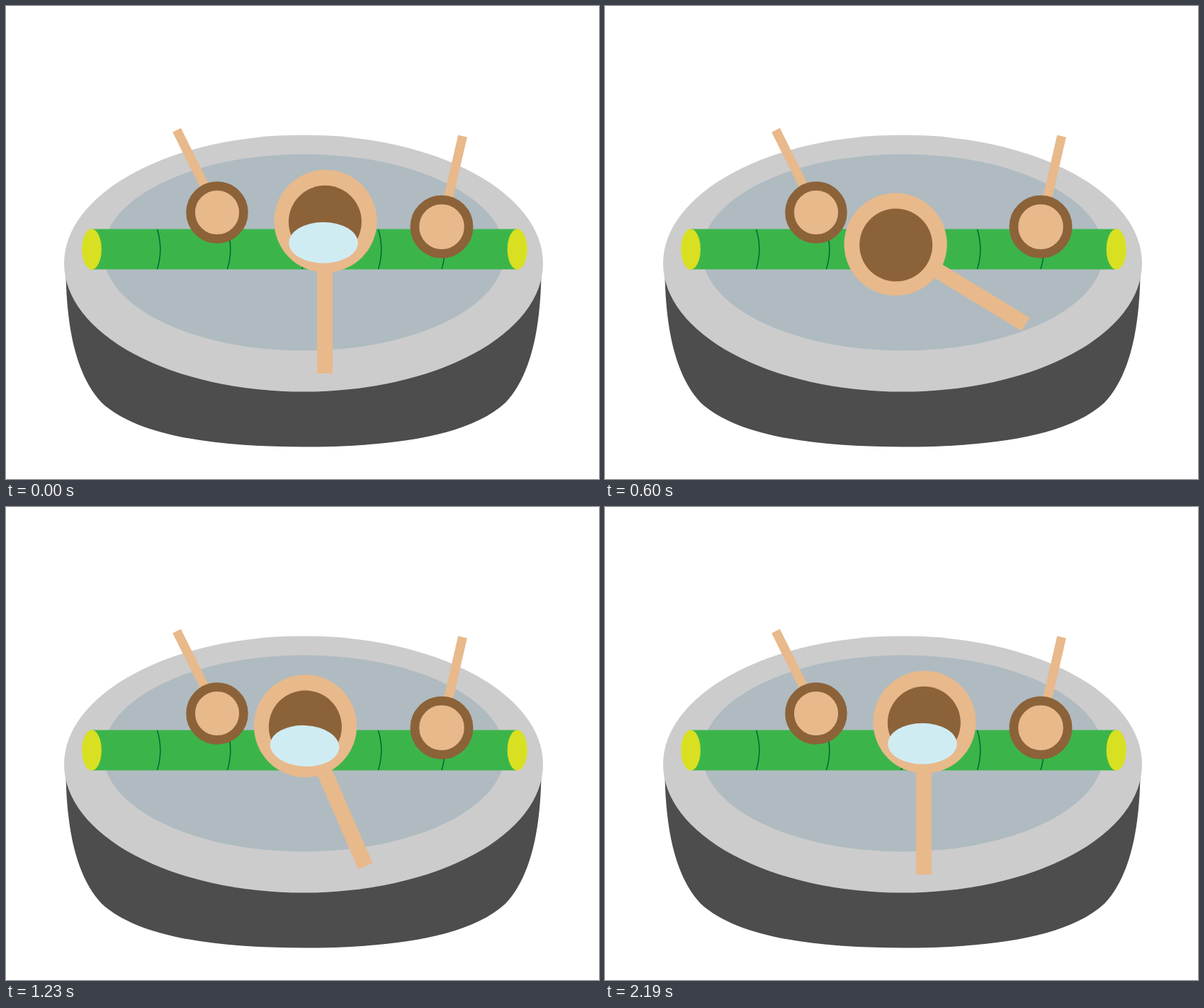
Recreate the animation shown at these times as an HTML page. Size 837 px wide and 669 px high, loop 2700 ms.

```html
<!DOCTYPE html>
<html lang="en">
<head>
<meta charset="utf-8">
<title>Water basin</title>
<style>
  html, body { margin: 0; width: 100%; height: 100%; overflow: hidden; background: #fff; }
  svg { display: block; width: 837px; height: 669px; }
</style>
</head>
<body>
<svg viewBox="0 0 837 669">
  <defs>
    <path id="dropShape" fill="#d0ecf3" d="M2.5-13C3-7 6.7-2 6.2 4C5.6 10 2 13.5-1.5 13C-6 12.5-7 8-6 4C-5-1 0-6 2.5-13Z"/>
    <path id="node" fill="none" stroke="#006837" stroke-width="1.5" d="M0 316Q8.6 344 0 372"/>
    <path id="dip" d="M450 269.5C461 320 446 342 388.3 336.3"/>
    <path id="lift" d="M388.3 336.3C403 317.5 425 304 451 304.3"/>
  </defs>

  <path fill="#4d4d4d" d="M84.5 380C86 470 104 528 135 561C190 612 310 623.5 420 623.5S650 612 705 561C736 528 754 470 755.5 380Z"/>
  <ellipse cx="420" cy="364" rx="338" ry="181.5" fill="#ccc"/>
  <ellipse cx="420.5" cy="348.5" rx="283.5" ry="139" fill="#afbbc1"/>

  <rect x="121" y="315.5" width="600.5" height="57" fill="#3bb54a"/>
  <use href="#node" x="213.5"/>
  <use href="#node" x="312.5"/>
  <use href="#node" x="418"/>
  <use href="#node" x="525.5"/>
  <use href="#node" x="615"/>
  <g fill="#d9e021">
    <ellipse cx="121" cy="344" rx="13.8" ry="28.7"/>
    <ellipse cx="721.7" cy="344" rx="14" ry="28.7"/>
  </g>

  <g stroke="#e8b98b" stroke-width="13">
    <path d="M241 175.5L298 290"/>
    <path d="M644.5 184L615 312"/>
  </g>
  <g fill="#e8b98b" stroke="#8c6239" stroke-width="12.7">
    <circle cx="298" cy="292" r="37.4"/>
    <circle cx="615" cy="312.2" r="38.1"/>
  </g>

  <g id="ladle">
    <rect x="-12" y="40" width="22" height="175.5" fill="#e8b98b"/>
    <circle r="72.6" fill="#e8b98b"/>
    <circle cx="-.6" cy="1" r="51.5" fill="#8c6239"/>
  </g>
  <ellipse id="water" rx="48.75" ry="29" fill="#d0ecf3"/>
  <g id="drops"></g>
</svg>
<script>
const LOOP = 2700, STEP = 30, TILT = 58.6;
const RAISE = 60, DIP = 210, LIFT = 690, REST = 1590;
const byId = id => document.getElementById(id);
const ladle = byId('ladle'), water = byId('water');
const dipPath = byId('dip'), liftPath = byId('lift');

// Each row: time, x and y relative to the bowl, rotation, opacity.
const waterKeys = [
  [RAISE, -3, 30.5, 0, 1],
  [DIP, -3, 30.5, 0, 0],
  [600, -4.5, 26, 14.5, 0],
  [LIFT, -4.5, 26.3, 14.5, 1],
  [990, -4.5, 28, 12.5, 1],
  [1440, 2.2, 28.3, -5.5, 1],
  [REST, 4.3, 35.5, 0, 1],
  [2190, -3, 30.5, 0, 1]
];

const drops = [
  { start: 1275, x: 442, y: 389, drift: 4 },
  { start: 1445, x: 423, y: 406, drift: 0 },
  { start: 1545, x: 466.5, y: 392.5, drift: 0 },
  { start: 1630, x: 446, y: 384.5, drift: 0 }
];
const DROP_TIME = 560, DROP_FALL = 37;
for (const drop of drops) {
  drop.el = document.createElementNS('http://www.w3.org/2000/svg', 'use');
  drop.el.setAttribute('href', '#dropShape');
  byId('drops').append(drop.el);
}

const progress = (t, from, to) => Math.min(1, Math.max(0, (t - from) / (to - from)));
const mix = (a, b, p) => a + (b - a) * p;
const along = (path, p) => path.getPointAtLength(path.getTotalLength() * p);

function sample(keys, t) {
  let i = 0;
  while (i < keys.length - 2 && t >= keys[i + 1][0]) i++;
  const a = keys[i], b = keys[i + 1], p = progress(t, a[0], b[0]);
  return a.slice(1).map((v, j) => mix(v, b[j + 1], p));
}

function bowlPosition(t) {
  if (t < DIP) {
    const p = progress(t, RAISE, DIP);
    return { x: mix(451, 450, p), y: mix(304.3, 269.5, p) };
  }
  return t < LIFT
    ? along(dipPath, progress(t, DIP, LIFT))
    : along(liftPath, progress(t, LIFT, REST));
}

function place(el, x, y, angle = 0) {
  el.setAttribute('transform', `translate(${x} ${y}) rotate(${angle})`);
}

function render(t) {
  const { x, y } = bowlPosition(t);
  const tilt = TILT * (progress(t, RAISE, DIP) - progress(t, LIFT, REST));
  place(ladle, x, y, -tilt);

  const [dx, dy, angle, opacity] = sample(waterKeys, t);
  place(water, x + dx, y + dy, angle);
  water.setAttribute('opacity', opacity);

  for (const drop of drops) {
    const p = progress(t, drop.start, drop.start + DROP_TIME);
    place(drop.el, drop.x + drop.drift * p, drop.y + DROP_FALL * p);
    drop.el.setAttribute('opacity', t < drop.start ? 0 : 1 - p);
  }
}

const begin = performance.now();
function tick() {
  const t = (performance.now() - begin) % LOOP;
  render(Math.floor(t / STEP) * STEP);
  requestAnimationFrame(tick);
}
tick();
</script>
</body>
</html>
```
